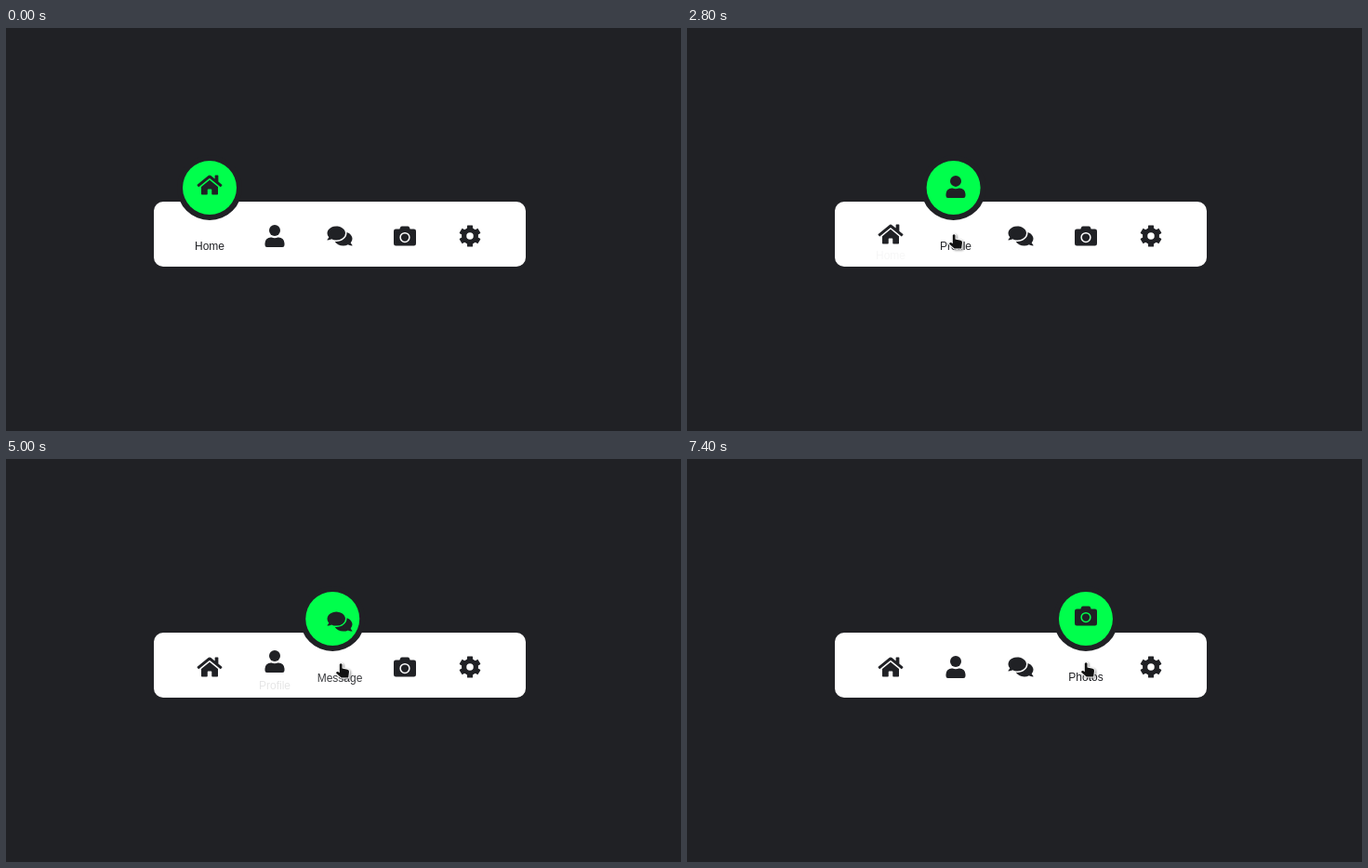
An HTML page that plays this animation: 726 px wide and 434 px high, repeating every 8000 ms.

```html
<!DOCTYPE html>
<html lang="en">
<head>
<meta charset="utf-8">
<title>Navigation menu</title>
<style>
  :root { --dark: #202125; --accent: #00ff4c; }
  html, body { margin: 0; width: 100%; height: 100%; overflow: hidden; background: var(--dark); }
  svg { display: block; }
  .icon { fill: var(--dark); fill-rule: evenodd; }
  .label { font: 12px "Liberation Sans", Arial, sans-serif; fill: var(--dark); text-anchor: middle; }
  #cursor { filter: drop-shadow(1px 1px 1px rgba(0, 0, 0, .45)); }
  #cursor path { fill: #111; stroke: #fff; stroke-width: 2; stroke-linejoin: round; paint-order: stroke; }
</style>
</head>
<body>
<svg width="726" height="434" viewBox="0 0 726 434">
  <rect x="159" y="187" width="400" height="70" rx="10" fill="#fff"/>
  <g id="indicator">
    <circle cy="172" r="35" fill="var(--dark)"/>
    <circle cy="172" r="29" fill="var(--accent)"/>
  </g>
  <g id="items"></g>
  <g id="cursor">
    <path id="arrow" d="M0 0V16L3.7 12.6L6.2 18L8.8 16.9L6.4 11.5H11.5Z"/>
    <path id="hand" d="M-1.2 1Q.2-.6 1.5 1V5.4L7.3 6.8Q9 7.4 9 9L8.2 15.6H.6L-5 10.6Q-4.6 8.4-2.6 9.3L-1.2 10.3Z"/>
  </g>
</svg>
<script>
const LOOP = 8000, STEP = 100, MOVE = 500, LIFT = 55;

const tooth = a => `<rect x="192" y="11" width="128" height="100" rx="12" transform="rotate(${a} 256 256)"/>`;
const path = d => `<path d="${d}"/>`;

// Icons sit on a 512-unit em; width is the glyph's own advance.
const menu = [
  { label: 'Home', width: 576, art: path(
    'M280.4 148.3L96 300V464a16 16 0 0 0 16 16H224a16 16 0 0 0 16-16V368a16 16 0 0 1 16-16h64a16 16 0 0 1 16 16v96a16 16 0 0 0 16 16H464a16 16 0 0 0 16-16V300L295.7 148.3a12 12 0 0 0-15.3 0z' +
    'M571.6 251.5L488 182.6V44a12 12 0 0 0-12-12h-56a12 12 0 0 0-12 12v72.6L318.5 43a48 48 0 0 0-61 0L4.3 251.5a12 12 0 0 0-1.6 16.9l25.5 31A12 12 0 0 0 45.2 301L280.4 107.3a12 12 0 0 1 15.3 0L530.9 301a12 12 0 0 0 16.9-1.6l25.5-31a12 12 0 0 0-1.7-16.9z') },
  { label: 'Profile', width: 448, art: '<circle cx="224" cy="128" r="128"/>' + path(
    'M134.4 288h16.7a175 175 0 0 0 145.8 0h16.7A134.4 134.4 0 0 1 448 422.4V464a48 48 0 0 1-48 48H48a48 48 0 0 1-48-48V422.4A134.4 134.4 0 0 1 134.4 288z') },
  { label: 'Message', width: 576, art: path(
    'M416 192A208 160 0 1 0 38 284C25 314 2 338.5 2 338.5A8 8 0 0 0 8 352C45 352 75 340 96.700 327A250 250 0 0 0 208 352A208 160 0 0 0 416 192z' +
    'M538 412A137 137 0 0 0 576 320C576 253 522.500 196 446.700 172Q448 182 448 192C448 298 340 384 208 384Q192 384 176.300 382C208 440 282 480 368 480A250 250 0 0 0 479.300 455C501 468 531 480 568 480A8 8 0 0 0 573.800 466.500S551 442 538 412z') },
  { label: 'Photos', width: 512, art: path(
    'M512 144v288a48 48 0 0 1-48 48H48a48 48 0 0 1-48-48V144a48 48 0 0 1 48-48h88l12.300-33A48 48 0 0 1 193 32h126a48 48 0 0 1 45 31L376 96h88a48 48 0 0 1 48 48z' +
    'M376 288a120 120 0 1 0-240 0a120 120 0 1 0 240 0z' +
    'M344 288a88 88 0 1 1-176 0a88 88 0 1 1 176 0z') },
  { label: 'Settings', width: 512, art:
    '<circle cx="256" cy="256" r="136" fill="none" stroke="var(--dark)" stroke-width="112"/>' +
    [0, 60, 120, 180, 240, 300].map(tooth).join('') }
];

// Start time of each switch and the item it selects.
const switches = [[2417, 1], [4697, 2], [6917, 3]];

// Pointer tip: time, x, y. It holds its place between groups.
const track = [
  [800, 142, 32], [900, 150, 48], [1000, 168, 82], [1100, 192, 126], [1200, 216, 164],
  [1300, 240, 193], [1400, 258, 209], [1500, 268, 213], [1600, 276, 217], [1700, 287, 222],
  [3500, 308, 222], [3600, 335, 222], [3700, 345, 221], [3900, 352, 220], [4000, 360, 220],
  [5900, 364, 223], [6000, 380, 231], [6100, 402, 234], [6200, 420, 226], [6300, 429, 219]
];

const $ = id => document.getElementById(id);
const centre = i => 219 + 70 * i;
const shift = (el, x, y) => el.setAttribute('transform', `translate(${x} ${y})`);

$('items').innerHTML = menu.map((m, i) => `
  <g class="icon"><g transform="translate(${centre(i)} 224) scale(${24 / 512}) translate(${-m.width / 2} -256)">${m.art}</g></g>
  <text class="label" x="${centre(i)}" y="239">${m.label}</text>`).join('');
const icons = document.querySelectorAll('.icon');
const labels = document.querySelectorAll('.label');

// The CSS "ease" curve, cubic-bezier(.25, .1, .25, 1).
function ease(x) {
  if (x <= 0) return 0;
  if (x >= 1) return 1;
  let lo = 0, hi = 1;
  for (let i = 0; i < 24; i++) {
    const s = (lo + hi) / 2;
    if (.75 * s * (1 - s) + s ** 3 < x) lo = s; else hi = s;
  }
  const s = lo, r = 1 - s;
  return .3 * r * r * s + 3 * r * s * s + s ** 3;
}

function draw(t) {
  const active = [1, 0, 0, 0, 0];
  let x = centre(0);
  for (const [start, item] of switches) {
    if (t < start) break;
    const p = ease((t - start) / MOVE);
    active[item - 1] = 1 - p;
    active[item] = p;
    x = centre(item - 1 + p);
  }
  shift($('indicator'), x, 0);
  active.forEach((p, i) => {
    shift(icons[i], 0, -LIFT * p);
    shift(labels[i], 0, 10 * (1 - p));
    labels[i].style.opacity = p;
  });

  const spot = track.filter(k => k[0] <= t).pop();
  $('cursor').style.display = spot ? '' : 'none';
  if (spot) {
    shift($('cursor'), spot[1], spot[2]);
    const overMenu = spot[2] > 187;
    $('hand').style.display = overMenu ? '' : 'none';
    $('arrow').style.display = overMenu ? 'none' : '';
  }
}

const began = performance.now();
function tick() {
  const t = (performance.now() - began) % LOOP;
  draw(Math.floor(t / STEP) * STEP);
  requestAnimationFrame(tick);
}
tick();
</script>
</body>
</html>
```
